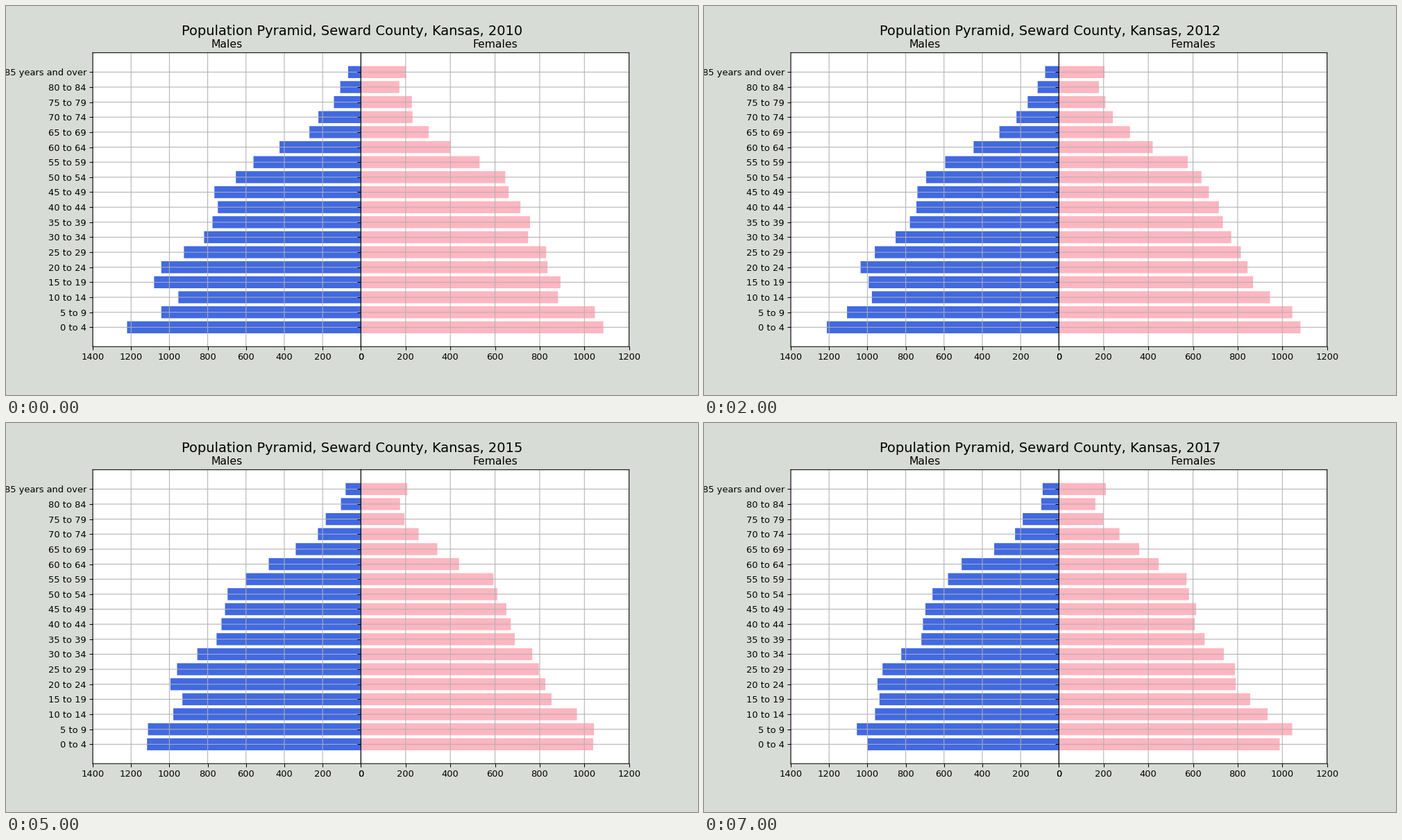
These frames come from a looping animation (997x561 px, 8000 ms). A matplotlib script:

```python
import numpy as np
import matplotlib.pyplot as plt
from matplotlib.animation import FuncAnimation

WIDTH, HEIGHT, DPI = 997, 561, 96
FIRST_YEAR, YEARS = 2010, 8

AGES = [f"{a} to {a + 4}" for a in range(0, 85, 5)] + ["85 years and over"]
ROWS = np.arange(len(AGES))

# Head counts in the first and last year, youngest group first
MALES = np.array([
    [1221, 1042, 953, 1080, 1042, 924, 819, 775, 747,
     765, 653, 561, 425, 269, 222, 141, 108, 67],
    [999, 1055, 960, 937, 947, 921, 823, 718, 710,
     697, 660, 579, 508, 338, 229, 189, 92, 85]])
FEMALES = np.array([
    [1085, 1047, 882, 893, 835, 829, 748, 757, 714,
     661, 646, 531, 401, 303, 231, 228, 172, 202],
    [988, 1044, 934, 856, 791, 788, 738, 652, 608,
     614, 582, 571, 446, 359, 271, 198, 163, 210]])

# Share of the next younger group that moves up into each group
STAY = np.interp(ROWS, [0, 1, 11, 12], [1, 0.96, 0.96, 0.82])


def head_counts(ends, t):
    """Drift from first to last year, swelled by the cohorts growing older."""
    start, end = ends
    arriving = np.append(start[0], start[:-1]) * STAY
    swell = 0.6 * (arriving - (start + end) / 2)
    swell[-1] = 0  # the open-ended group only drifts
    return start + (end - start) * t + 4 * t * (1 - t) * swell


# Unsnapped thin lines give the softly scaled look
plt.rcParams.update({
    "font.family": "DejaVu Sans", "font.size": 9.75, "path.snap": False,
    "axes.linewidth": 0.78, "grid.linewidth": 0.78, "axes.titlepad": 5.85,
    "xtick.major.size": 3.4, "ytick.major.size": 3.4,
    "xtick.major.width": 0.78, "ytick.major.width": 0.78,
    "xtick.major.pad": 3.4, "ytick.major.pad": 3.4})
fig, (left, right) = plt.subplots(
    1, 2, figsize=(WIDTH / DPI, HEIGHT / DPI), dpi=DPI, facecolor="#d8dcd6")
fig.subplots_adjust(left=0.1254, right=0.9004, bottom=0.1243, top=0.8799,
                    wspace=0)
heading = fig.suptitle("", fontsize=14.65, y=0.951)


def make_side(ax, title, color, limit):
    bars = ax.barh(ROWS, np.zeros(len(ROWS)), color=color)
    ax.set_title(title)
    ax.set_xlim(0, limit)
    ax.set_xticks(range(0, limit + 1, 200))
    margin = 0.4 + 0.05 * (len(ROWS) - 0.2)
    ax.set_ylim(-margin, len(ROWS) - 1 + margin)
    ax.set_yticks(ROWS)
    ax.grid(True)
    return bars


male_bars = make_side(left, "Males", "royalblue", 1400)
female_bars = make_side(right, "Females", "lightpink", 1200)
left.invert_xaxis()
left.set_yticklabels(AGES)
right.set_yticklabels([])


def update(i):
    heading.set_text(
        f"Population Pyramid, Seward County, Kansas, {FIRST_YEAR + i}")
    t = i / (YEARS - 1)
    for bars, ends in ((male_bars, MALES), (female_bars, FEMALES)):
        for bar, count in zip(bars, head_counts(ends, t)):
            bar.set_width(count)
    return [heading, *male_bars, *female_bars]


anim = FuncAnimation(fig, update, frames=YEARS, init_func=lambda: update(0),
                     interval=1000, repeat=True, repeat_delay=0)
plt.show()
```
